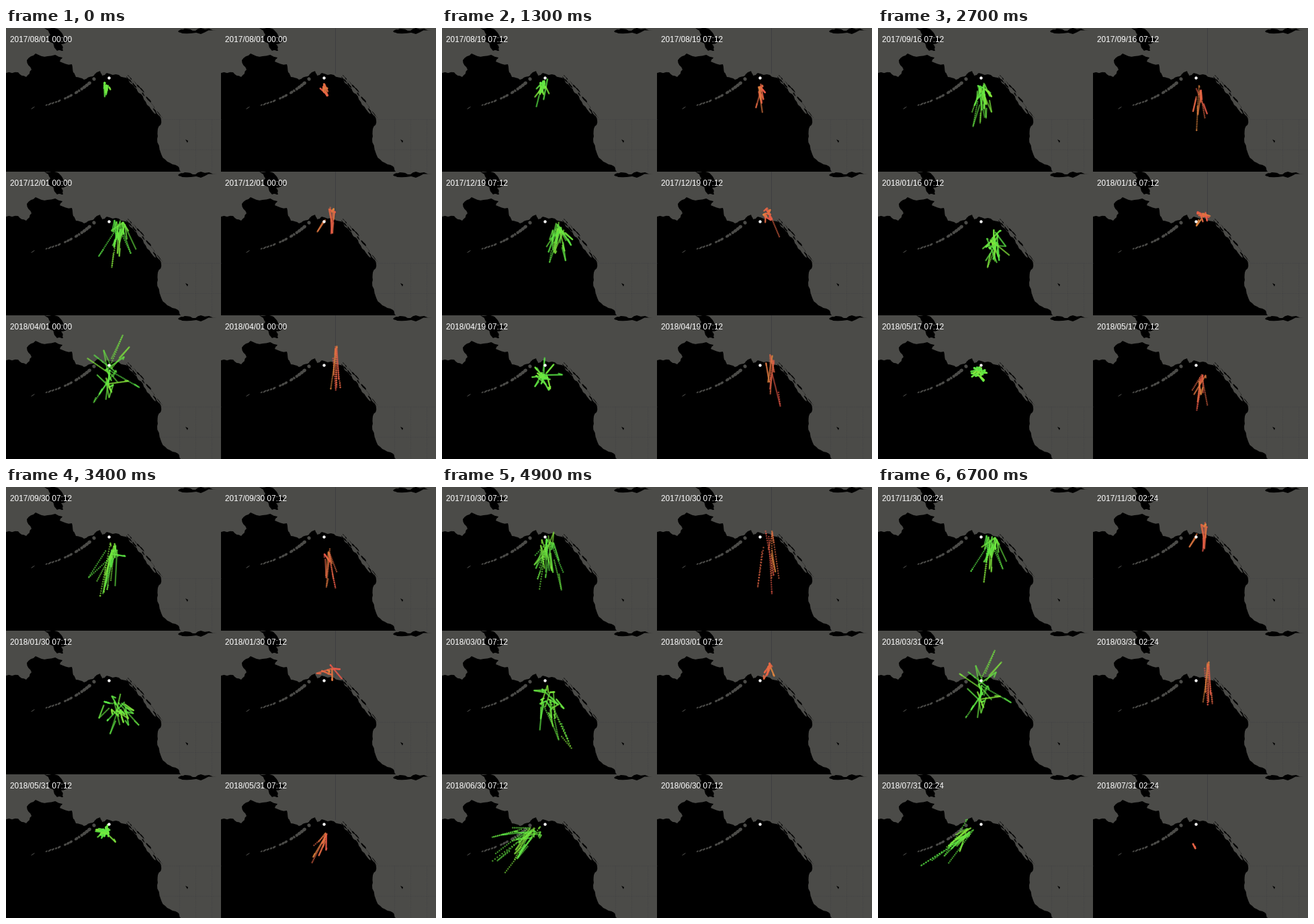
These frames come from a looping animation (640x642 px, 6.8 s). A matplotlib script:

```python
import matplotlib.pyplot as plt
import numpy as np
from matplotlib.animation import FuncAnimation
from matplotlib.patches import Ellipse, Polygon

W, H, DPI = 640, 642, 64
PX = 72 / DPI
FRAMES, STEP_MS = 68, 100
PANEL_W, PANEL_H = 320, 214

LAND, SEA, BORDER = "#4b4b48", "#000000", "#3b3b40"
STARTS = ("2017-08-01T00:00", "2017-12-01T00:00", "2018-04-01T00:00")
SPANS = (122, 121, 122)
OFFSETS = (0, 122, 243)

AGES = np.linspace(0, 10.5, 28)  # days covered by one trail


class Herd:
    """Animals that travel between a shared hub and scattered feeding spots.

    Each key is (day, hub x, hub y, reach x, reach y, spread).
    """

    def __init__(self, seed, count, join, leave, colours, keys):
        rng = np.random.default_rng(seed)
        self.keys = np.array(keys, float).T
        low, high = np.array(colours) / 255
        self.animals = []
        for _ in range(count):
            gap = rng.uniform(7, 11)
            fixes = np.arange(rng.uniform(-30, -20), 385, gap)
            spots = np.array([self.spot(rng, day, i % 2) for i, day in enumerate(fixes)])
            rgb = low + (high - low) * rng.beta(1, 2.5)
            life = rng.uniform(*join), rng.uniform(*leave)
            self.animals.append((fixes, spots, rgb, life))

    def spot(self, rng, day, away):
        hx, hy, rx, ry, spread = (np.interp(day, self.keys[0], k) for k in self.keys[1:])
        reach = away * rng.lognormal(0, 0.25)
        scatter = rng.normal(0, spread * (1 if away else 0.4), 2)
        return np.array([hx, hy]) + reach * np.array([rx, ry]) + scatter

    def at(self, day):
        points, colours = [np.empty((0, 2))], [np.empty((0, 4))]
        for fixes, spots, rgb, (join, leave) in self.animals:
            times = day - AGES
            times = times[(times > join) & (times < leave)]
            points.append(np.c_[np.interp(times, fixes, spots[:, 0]),
                                np.interp(times, fixes, spots[:, 1])])
            colours.append(np.tile([*rgb, 0.6], (len(times), 1)))
        return np.vstack(points), np.vstack(colours)


green = Herd(4, 16, (-25, 25), (335, 420), [(85, 230, 70), (165, 235, 55)], [
    (0, 148, 84, 0, 10, 6),
    (30, 152, 80, 0, 27, 8),
    (60, 160, 95, 0, 44, 16),
    (90, 160, 78, 2, 46, 15),
    (122, 171, 76, 0, 32, 11),
    (152, 178, 88, -6, 36, 9),
    (182, 162, 120, 6, 10, 17),
    (212, 158, 90, 0, 36, 16),
    (244, 153, 90, 8, 4, 20),
    (273, 150, 88, 2, 4, 9),
    (303, 149, 82, -2, 5, 8),
    (333, 138, 78, -48, 38, 16),
    (364, 136, 84, -38, 28, 10),
])
orange_tones = [(235, 88, 72), (220, 145, 60)]
orange = Herd(11, 6, (-30, -2), (306, 322), orange_tones, [
    (0, 152, 86, 3, 16, 6),
    (30, 155, 90, 5, 28, 7),
    (60, 160, 98, 6, 48, 10),
    (90, 167, 60, 2, 76, 9),
    (120, 164, 56, 2, 22, 8),
    (152, 160, 66, 4, 8, 9),
    (212, 167, 48, 2, 14, 7),
    (246, 170, 48, 2, 66, 6),
    (273, 166, 88, 2, 42, 6),
    (303, 155, 90, -22, 22, 8),
])
late = Herd(3, 1, (344, 346), (400, 410), orange_tones, [(0, 149, 103, 4, 7, 1.5)])


def roughen(shape, rng, levels=2, amount=0.14):
    """Break every edge of a closed outline into smaller jagged ones."""
    p = np.array(shape, float)
    for _ in range(levels):
        nxt = np.roll(p, -1, axis=0)
        edge = nxt - p
        edge[np.hypot(*edge.T) > 40] = 0
        normal = np.c_[-edge[:, 1], edge[:, 0]]
        mid = (p + nxt) / 2 + normal * rng.uniform(-amount, amount, (len(p), 1))
        p = np.stack([p, mid], axis=1).reshape(-1, 2)
    return p


def curve(a, b, c, n):
    """Points along a quadratic curve."""
    t = np.linspace(0, 1, n)[:, None]
    a, b, c = map(np.array, (a, b, c))
    return a * (1 - t) ** 2 + 2 * b * t * (1 - t) + c * t ** 2


ocean = [(0, 67), (18, 66), (30, 73), (38, 62), (31, 48), (44, 38), (62, 42),
         (84, 44), (80, 50), (98, 54), (100, 66), (104, 73), (116, 77), (129, 72),
         (135, 66), (140, 64), (143, 71), (150, 67), (168, 70), (182, 76),
         (190, 86), (197, 96), (208, 110), (220, 124), (231, 137), (226, 150),
         (225, 165), (230, 185), (240, 199), (256, 206), (260, 214), (0, 214)]
strait = [(57, 0), (66, 10), (60, 16), (76, 34), (85, 34), (82, 24), (97, 18),
          (88, 14), (80, 4), (72, 0)]
arctic = [(256, 5), (266, 1), (282, 4), (290, 0), (314, 4), (290, 9), (262, 8)]
lake = [(267, 166), (271, 168), (270, 171)]

rng = np.random.default_rng(7)
waters = [roughen(shape, rng) for shape in (ocean, strait, arctic)] + [np.array(lake)]
peninsula = curve((131, 76), (95, 110), (40, 119), 22)
inlets = curve((182, 73), (196, 84), (231, 134), 16)

# centre, width, height, angle, colour
blobs = [(p, rng.uniform(3, 7), 5.5 * (1 - i / 26), -35, LAND)
         for i, p in enumerate(peninsula) if rng.random() < 0.8]
blobs += [(p + rng.normal(0, 1.5, 2), rng.uniform(6, 11), rng.uniform(1, 2.5), 52, colour)
          for p in inlets for colour in (SEA, LAND)]

borders = [[(232, 136), (320, 136)], [(228, 181), (320, 181)]]
borders += [[(x, 136), (x, 214)] for x in (258, 282, 306)]

fig = plt.figure(figsize=(W / DPI, H / DPI), dpi=DPI, facecolor=LAND)
ax = fig.add_axes([0, 0, 1, 1])
ax.set_xlim(0, W)
ax.set_ylim(H, 0)
ax.axis("off")


def draw_map(x, y):
    shift = np.array([x, y])
    for shape in waters:
        ax.add_patch(Polygon(shape + shift, fc=SEA, ec="none"))
    for centre, w, h, angle, colour in blobs:
        ax.add_patch(Ellipse(centre + shift, w, h, angle=angle, fc=colour, ec="none"))
    for line in borders:
        ax.plot(*(np.array(line) + shift).T, color=BORDER, lw=0.6 * PX, ls=":")
    if x:
        ax.plot([x + 170] * 2, [y, y + 67], color=BORDER, lw=0.8 * PX)


labels, clouds = [], []
for row in range(3):
    for col, herds in enumerate(([green], [orange, late])):
        x, y = col * PANEL_W, row * PANEL_H
        draw_map(x, y)
        for herd in herds:
            cloud = ax.scatter([], [], s=(2.5 * PX) ** 2, linewidths=0, zorder=3)
            clouds.append((cloud, herd, row, np.array([x, y])))
        ax.scatter([x + 152.5 + 0.5 * col], [y + 74], s=(4.4 * PX) ** 2, c="white",
                   linewidths=0, zorder=4)
        label = ax.text(x + 5.5, y + 21, "", color="white", fontsize=11.8 * PX,
                        family="Liberation Sans", va="baseline", zorder=5)
        labels.append((label, row))


def elapsed(n, span):
    """Days since the panel's start: ease in, two days a frame, ease out."""
    ease = 7.7
    days = n * n / ease if n < ease else 2 * n - ease
    if n > 59:
        days -= (127.2 - span) * ((n - 59) / 8) ** 2
    return round(days, 1)


def stamp(row, days):
    time = np.datetime64(STARTS[row]) + np.timedelta64(int(round(days * 10)) * 144, "m")
    return str(time).replace("-", "/").replace("T", " ")


def update(n):
    days = [elapsed(n, span) for span in SPANS]
    for label, row in labels:
        label.set_text(stamp(row, days[row]))
    for cloud, herd, row, shift in clouds:
        points, colours = herd.at(OFFSETS[row] + days[row])
        cloud.set_offsets(points + shift)
        cloud.set_facecolors(colours)
    return [c[0] for c in clouds] + [t[0] for t in labels]


anim = FuncAnimation(fig, update, frames=FRAMES, interval=STEP_MS, repeat=True,
                     repeat_delay=0, blit=False)
plt.show()
```
